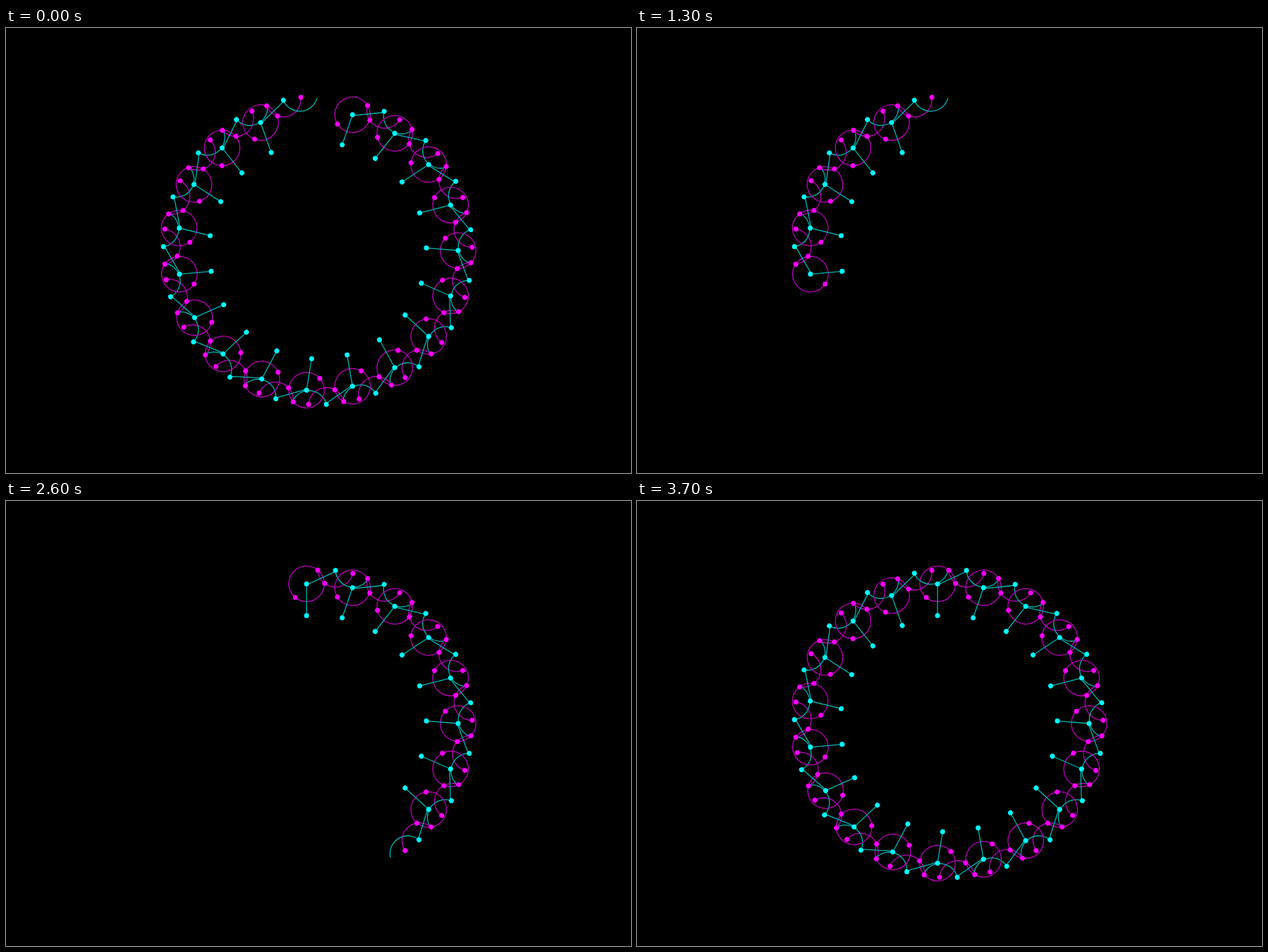
Recreate the animation shown at these times as an HTML page. Size 886 px wide and 632 px high, loop 3.8 s.

```html
<!DOCTYPE html>
<html lang="en">
<head>
<meta charset="utf-8">
<title>Ring of linked arms</title>
<style>
  html, body { margin: 0; width: 100%; height: 100%; overflow: hidden; background: #000; }
  svg { display: block; width: 886px; height: 632px; }
  .line { fill: none; stroke-width: 1.3; }
</style>
</head>
<body>
<svg viewBox="0 0 886 632">
  <rect width="886" height="632" fill="#000"/>
  <g id="lines"></g>
  <g id="dots"></g>
</svg>
<script>
// The step falls slightly short of a full turn over all links.
const COUNT = 19, STEP = 18.92, FRAME = 100;
const RING = { x: 442, y: 316, r: 199 };
const R = 25.2, ARM = 45.2;
const MAGENTA = '#f0f', CYAN = '#0ff';
const DARK_MAGENTA = '#b800b8', DARK_CYAN = '#00b4b4';

function polar(r, deg, from = [0, 0]) {
  const a = deg * Math.PI / 180;
  return [from[0] + r * Math.cos(a), from[1] + r * Math.sin(a)];
}

function make(parent, tag, attrs) {
  const el = document.createElementNS('http://www.w3.org/2000/svg', tag);
  for (const key in attrs) el.setAttribute(key, attrs[key]);
  return parent.appendChild(el);
}

// One link, drawn around its hub in unrotated position.
const hub = [0, 0];
const hand = polar(ARM, 90);
const elbow = polar(ARM, -24.9);
const tip = polar(67.3, -12.7);
const pivot = polar(69.6, -17.4);
const arcEnd = polar(R, 35.3, pivot);
const upper = polar(25.1, -50.6);
const lower = polar(25.1, 129.2);
const side = polar(25.7, -1.7);
const shift = polar(1.3, 65);

const segment = (a, b) => `M${a}L${b}`;
const arc = (a, b) => `M${a}A${R} ${R} 0 0 0 ${b}`;
const shifted = p => [p[0] + shift[0], p[1] + shift[1]];

function drawLines(g) {
  const path = (d, stroke) => make(g, 'path', { d, stroke, class: 'line' });
  make(g, 'circle', { r: R, stroke: DARK_MAGENTA, class: 'line' });
  path(arc(upper, tip), DARK_MAGENTA);
  path(segment(hub, hand), DARK_CYAN);
  path(segment(shifted(hub), shifted(elbow)), DARK_CYAN);
  path(arc(elbow, arcEnd), DARK_CYAN);
}

function drawDots(g) {
  const dot = ([cx, cy], fill) => make(g, 'circle', { cx, cy, r: 3.5, fill });
  [upper, lower, side, tip].forEach(p => dot(p, MAGENTA));
  [hub, hand, elbow].forEach(p => dot(p, CYAN));
}

const lineLayer = document.getElementById('lines');
const dotLayer = document.getElementById('dots');
const links = Array.from({ length: COUNT }, (_, i) => {
  const [x, y] = polar(RING.r, (i - 5) * STEP, [RING.x, RING.y]);
  const transform = `translate(${x} ${y}) rotate(${i * STEP})`;
  const parts = [make(lineLayer, 'g', { transform }), make(dotLayer, 'g', { transform })];
  drawLines(parts[0]);
  drawDots(parts[1]);
  return parts;
});

// The ring is erased link by link, then rebuilt in the same order.
function render(ms) {
  const n = Math.floor(ms / FRAME) % (2 * COUNT);
  links.forEach((parts, i) => {
    const on = n < COUNT ? i > n : i <= n - COUNT;
    parts.forEach(p => p.setAttribute('visibility', on ? 'visible' : 'hidden'));
  });
}

const start = performance.now();
function tick() {
  render(performance.now() - start);
  requestAnimationFrame(tick);
}
tick();
</script>
</body>
</html>
```
